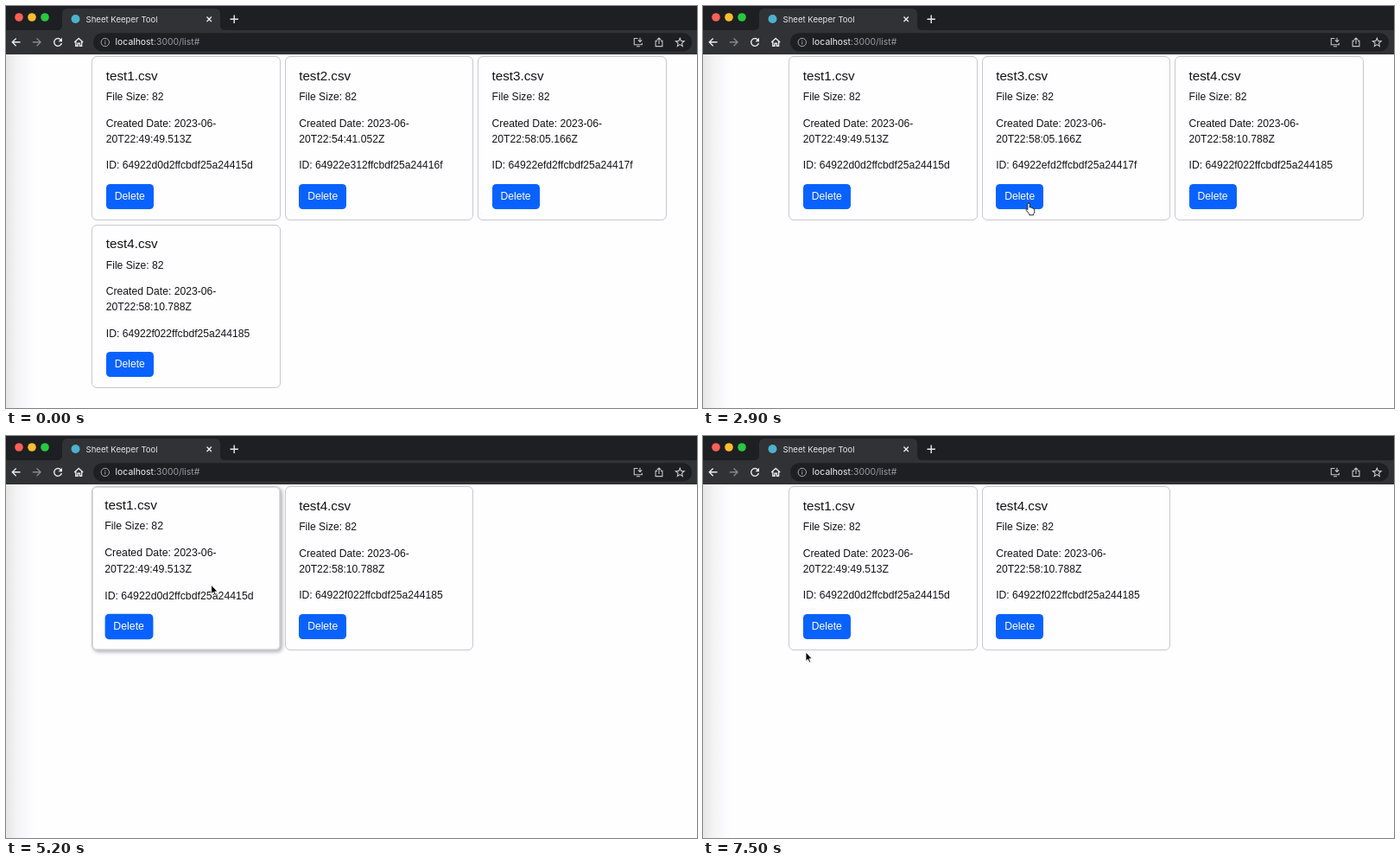
An HTML page that plays this animation: 800x465 px, repeating every 7600 ms.

```html
<!DOCTYPE html>
<html lang="en">
<head>
<meta charset="utf-8">
<title>File list</title>
<style>
  html, body { margin: 0; width: 100%; height: 100%; overflow: hidden; background: #fefdff; }
  #stage { position: relative; width: 800px; height: 465px; overflow: hidden;
    font: 12.15px/18.24px "Liberation Sans", Arial, sans-serif; color: #141414; }
  #edge { position: absolute; left: 0; top: 56px; width: 32px; bottom: 0;
    background: linear-gradient(90deg, #e7e6e7, #f5f4f5 40%, #fefdff); }
  svg { position: absolute; left: 0; top: 0; overflow: visible; }
  #chrome text { font-family: Inter, Roboto, sans-serif; }
  .line { fill: none; stroke: #e8e9eb; stroke-width: 1.4; }
  .dim { stroke: #85878b; }
  .card { position: absolute; box-sizing: border-box; width: 218.5px; height: 189.6px;
    border: 1px solid #c9c8ca; border-radius: 6px; background: #fefdff; }
  .body { position: absolute; inset: -1px; padding: 13.7px 0 0 16.6px; white-space: nowrap; }
  .body h5 { margin: 0 0 6.1px; font-size: 15.2px; line-height: 18.24px; font-weight: 400; }
  .body p { margin: 0 0 12.15px; }
  .body b { display: block; width: 55px; height: 28.9px; border-radius: 4.6px; color: #fff;
    font-weight: 400; line-height: 28.9px; text-align: center; }
</style>
</head>
<body>
<div id="stage">
  <div id="edge"></div>
  <div id="cards"></div>
  <svg id="chrome" width="800" height="56">
    <rect width="800" height="28" fill="#1d1f22"/>
    <rect y="28" width="800" height="28" fill="#303236"/>
    <path d="M59 28q6 0 6-6V9q0-6 6-6h171q6 0 6 6v13q0 6 6 6z" fill="#303236"/>
    <circle cx="15" cy="13" r="4.8" fill="#fe5f57"/>
    <circle cx="30" cy="13" r="4.8" fill="#febc2e"/>
    <circle cx="45" cy="13" r="4.8" fill="#28c840"/>
    <circle cx="80.5" cy="15" r="5" fill="#4cb2cc"/>
    <text x="92.5" y="18.6" font-size="9.6" fill="#e6e7e9">Sheet Keeper Tool</text>
    <path class="line" d="M232.5 12.5l5.4 5.4m0-5.4l-5.4 5.4M259.5 15.3h9.4m-4.7-4.7v9.4"/>
    <path class="line" d="M16.5 41.8H7.3m4.4-4.4l-4.4 4.4 4.4 4.4"/>
    <path class="line dim" d="M30.8 41.8H40m-4.4-4.4l4.4 4.4-4.4 4.4"/>
    <circle id="halo" cx="60" cy="42" r="10.3" fill="#494b4f"/>
    <g id="reload">
      <path class="line" d="M63.6 39.2a4.4 4.4 0 1 0 .8 3.8"/>
      <path d="M65 36.8v4.4h-4.4z" fill="#e8e9eb"/>
    </g>
    <path id="stop" class="line" d="M56.5 38.5l7 7m0-7l-7 7"/>
    <path class="line" d="M79.2 42l5-4.5 5 4.5M80.8 41v5.2h2.2v-3h2.4v3h2.2V41"/>
    <rect x="101" y="31.2" width="693" height="21.4" rx="10.7" fill="#1d1f23"/>
    <g class="line" style="stroke:#a3a5a9;stroke-width:1">
      <circle cx="114.8" cy="42" r="4.7"/><path d="M114.8 41.3v3.2m0-5.1v1.1"/>
    </g>
    <text x="126.6" y="45.4" font-size="10.4" fill="#f0f1f2">localhost<tspan fill="#999ba0">:3000/list#</tspan></text>
    <g class="line" style="stroke:#c5c7ca;stroke-width:1.1">
      <path d="M731.5 37.5h-4.2v7.2h9v-2M730 46.8h4M734 36.8v4.6m-2.2-2.1l2.2 2.1 2.2-2.1"/>
      <path d="M754 40.4h-1.9v6.2h7.8v-6.2H758M756 44v-7m-2.3 2.2l2.3-2.2 2.3 2.2"/>
      <path d="M780.3 37.2l1.4 3.2 3.5.3-2.7 2.3.8 3.5-3-1.9-3 1.9.8-3.5-2.7-2.3 3.5-.3z"/>
    </g>
  </svg>
  <svg id="pointer" width="14" height="16">
    <path id="arrow" fill="#000" stroke="#fff" stroke-width=".9"
      d="M0 0v10.5l2.4-2.2 1.6 3.8 1.7-.7-1.6-3.7h3.3z"/>
    <path id="hand" fill="#fff" stroke="#111" stroke-width=".9" transform="translate(-3.4 -.4)"
      d="M2.2 1.6a1.2 1.2 0 0 1 2.4 0v4l.3-.6q1.7-.3 1.8 1 1.7-.5 1.9.9 1.6-.2 1.6 1.4v2q0 1.6-1.2 2.6v1.3H4.2v-1.2L.6 8.8q-.7-1.3.5-1.6.6 0 1.1.8z"/>
  </svg>
</div>
<script>
const LOOP = 7600, STEP = 100, FADE = 400;
const $ = id => document.getElementById(id);

const files = [
  { name: "test1.csv", time: "20T22:49:49.513Z", id: "64922d0d2ffcbdf25a24415d", gone: Infinity },
  { name: "test2.csv", time: "20T22:54:41.052Z", id: "64922e312ffcbdf25a24416f", gone: 2600 },
  { name: "test3.csv", time: "20T22:58:05.166Z", id: "64922efd2ffcbdf25a24417f", gone: 4400 },
  { name: "test4.csv", time: "20T22:58:10.788Z", id: "64922f022ffcbdf25a244185", gone: Infinity }
];

for (const f of files) {
  f.card = document.createElement("div");
  f.card.className = "card";
  f.card.innerHTML = `<div class="body"><h5>${f.name}</h5><p>File Size: 82</p>
    <p>Created Date: 2023-06-<br>${f.time}</p><p>ID: ${f.id}</p><b>Delete</b></div>`;
  f.body = f.card.firstChild;
  f.button = f.card.querySelector("b");
  $("cards").append(f.card);
}

// Hover spans: start, end, and whether the end is abrupt
const cardHover = [
  [[5000, 5500, false]],
  [[900, 2600, true], [3000, 4400, true], [4500, 4900, false]]
];
const buttonHover = [[], [[1200, 2600, true], [3000, 4400, true], [4500, 4900, false]]];

// Pointer tip: time, x, y
const path = [
  [100, 392, 460], [800, 388, 258], [1200, 381, 232], [1600, 377, 228], [3500, 377, 228],
  [3700, 381, 225], [4400, 381, 225], [4800, 335, 233], [5100, 262, 190],
  [5700, 60, 43], [6700, 60, 43], [7200, 119, 250]
];

const clamp = v => Math.min(1, Math.max(0, v));
const within = (t, a, b) => t >= a && t < b;
const show = (el, on) => { el.style.display = on ? "" : "none"; };

function level(spans = [], t) {
  let best = 0;
  for (const [on, off, abrupt] of spans) {
    if (t < on || (abrupt && t >= off)) continue;
    const rise = clamp((t - on + STEP) / FADE);
    const fall = t < off ? 1 : 1 - clamp((t - off + STEP) / FADE);
    best = Math.max(best, Math.min(rise, fall));
  }
  return best;
}

function tipAt(t) {
  const next = path.findIndex(p => p[0] > t);
  if (next < 0) return path[path.length - 1].slice(1);
  if (next === 0) return path[0].slice(1);
  const [t0, x0, y0] = path[next - 1], [t1, x1, y1] = path[next];
  const u = (t - t0) / (t1 - t0), k = u * u * (3 - 2 * u) * .5 + u * .5;
  return [x0 + (x1 - x0) * k, y0 + (y1 - y0) * k];
}

function placeCard(f, slot, t) {
  const h = level(cardHover[slot], t), b = level(buttonHover[slot], t);
  const s = f.card.style;
  s.left = 99.2 + slot % 3 * 223.4 + "px";
  s.top = 58.3 + Math.floor(slot / 3) * 194.5 + "px";
  s.boxShadow = h ? `2px 2px 4px rgba(0,0,0,${.4 * h}), inset 0 0 0 1px rgba(0,0,0,${.18 * h})` : "none";
  f.body.style.transform = h ? `scale(${1 + .02 * h})` : "none";
  f.button.style.transform = b ? `scale(${1 + .02 * b})` : "none";
  f.button.style.background = `rgb(${9 - 2 * b},${98 - 16 * b},${254 - 42 * b})`;
  f.button.style.boxShadow = b ? `1px 2px 6px rgba(0,0,0,${.45 * b})` : "none";
}

function draw(t) {
  const blank = within(t, 6500, 6800);
  let slot = 0;
  for (const f of files) {
    const visible = !blank && t < f.gone;
    show(f.card, visible);
    if (visible) placeCard(f, slot++, t);
  }

  const [x, y] = tipAt(t), hand = within(t, 1200, 4900);
  $("pointer").style.transform = `translate(${x}px,${y}px)`;
  show($("pointer"), t >= 100);
  show($("hand"), hand);
  show($("arrow"), !hand);

  const loading = within(t, 6300, 6500);
  show($("halo"), within(t, 5700, 6800));
  show($("stop"), loading);
  show($("reload"), !loading);
}

const start = performance.now();
function tick() {
  const t = (performance.now() - start) % LOOP;
  draw(Math.floor(t / STEP) * STEP);
  requestAnimationFrame(tick);
}
tick();
</script>
</body>
</html>
```
